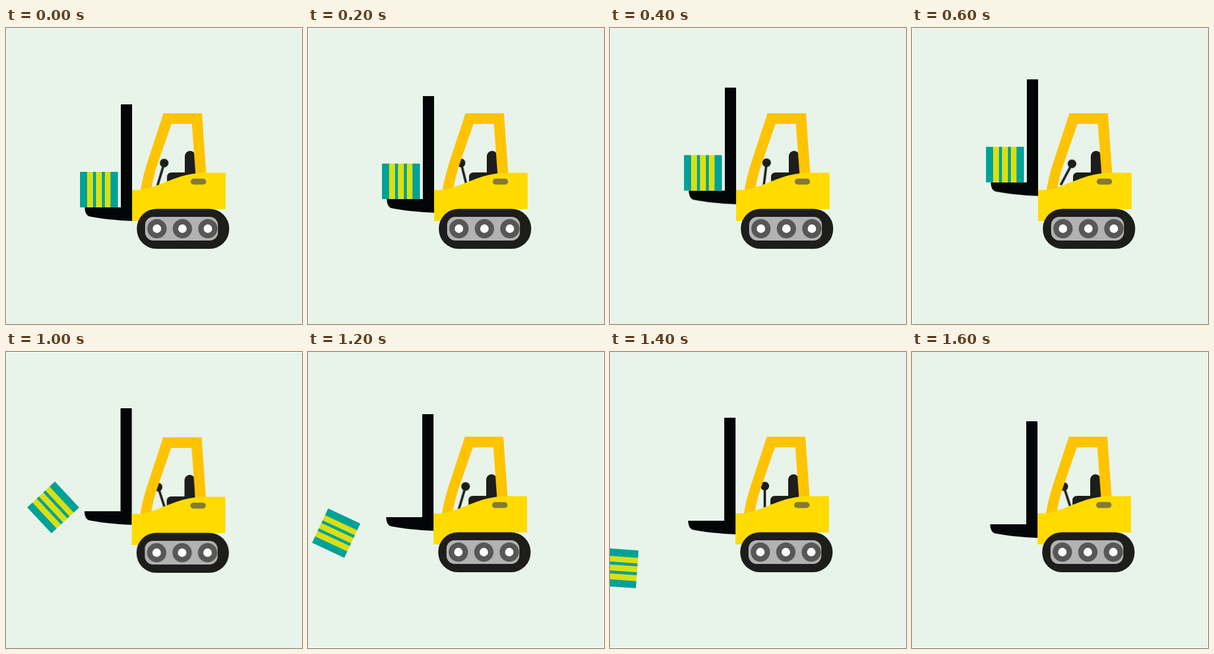
An HTML page for the animation above (1800 ms loop, 500 by 500 pixels).

```html
<!DOCTYPE html>
<html lang="en">
<head>
<meta charset="utf-8">
<title>Forklift</title>
<style>
  html, body { margin: 0; width: 100%; height: 100%; overflow: hidden; background: #fff; }
  svg { display: block; width: 100%; height: 100%; }
  .scene, .mast, .crate, .lever { animation: 1800ms step-end infinite; }
  .scene { animation-name: nudge; }
  .mast { animation-name: lift; }
  .crate { animation-name: drop; }
  .lever { animation-name: rock; transform-origin: 262.5px 244px; }

  @keyframes nudge {
    0% { transform: none; }
    55.55% { transform: translate(-.5px, 0); }
    66.66%, 100% { transform: translate(-1px, -1px); }
  }
  @keyframes lift {
    0% { transform: none; }
    11.11% { transform: translateY(-14px); }
    22.22% { transform: translateY(-28.3px); }
    33.33%, 44.44% { transform: translateY(-42.3px); }
    55.55% { transform: translateY(-34px); }
    66.66% { transform: translateY(-23px); }
    77.77% { transform: translateY(-17px); }
    88.88%, 100% { transform: translateY(-11px); }
  }
  @keyframes drop {
    0% { transform: translate(157px, 273px); visibility: visible; }
    11.11% { transform: translate(157px, 259px); }
    22.22% { transform: translate(157px, 244.7px); }
    33.33% { transform: translate(157px, 230.7px); }
    44.44% { transform: translate(142.3px, 225.5px) rotate(-21.5deg); }
    55.55% { transform: translate(80.2px, 262.6px) rotate(-43deg); }
    66.66% { transform: translate(48.7px, 307px) rotate(-65deg); }
    77.77% { transform: translate(17px, 366px) rotate(-86deg); visibility: visible; }
    88.88%, 100% { transform: translate(17px, 366px) rotate(-86deg); visibility: hidden; }
  }
  @keyframes rock {
    0% { transform: rotate(16.5deg); }
    11.11% { transform: rotate(-14deg); }
    22.22% { transform: rotate(7deg); }
    33.33% { transform: rotate(28deg); }
    44.44% { transform: rotate(5deg); }
    55.55% { transform: rotate(-18deg); }
    66.66% { transform: rotate(16.5deg); }
    77.77% { transform: rotate(0deg); }
    88.88%, 100% { transform: rotate(-18deg); }
  }
</style>
</head>
<body>
<svg viewBox="0 0 500 500">
  <defs>
    <g id="wheel">
      <circle r="16.3" fill="#575756"/>
      <circle r="7.2" fill="#fff"/>
    </g>
  </defs>
  <g class="scene">
    <rect x="1" y="1" width="499" height="499" fill="#e8f4ea"/>

    <path class="mast" fill="#040507" d="M133 303H194V129H213V326C186 325 160 322 142 318.500Q133.500 317 133 303Z"/>

    <g class="crate">
      <rect x="-32" y="-30" width="64" height="60" fill="#00a198"/>
      <path fill="#d9e012" d="M-20-30h10v60h-10zM-5-30h10v60h-10zM10-30h9.500v60H10z"/>
    </g>

    <!-- cab interior -->
    <g fill="#1d1d1b">
      <path d="M302 216.500a9 9 0 0 1 18 0V262H272V252q0-8 8-8h22z"/>
      <g class="lever">
        <path d="M262.500 228V268" stroke="#1d1d1b" stroke-width="4"/>
        <circle cx="262.500" cy="227.500" r="7.300"/>
      </g>
    </g>

    <path fill="#ffc400" d="M266 144H331L338.500 250H320.500L314 162H279.500L256 230Q249 250 245 275H227Q231 250 240 223Z"/>
    <path fill="#ffdb00" d="M213 273.500H228C262 268 290 245 335 244.500H371V306H300V326H213Z"/>
    <rect x="312" y="254.500" width="26" height="10" rx="5" fill="#83793b"/>

    <!-- track -->
    <rect x="221" y="305.500" width="156" height="67.500" rx="33" fill="#1d1d1b"/>
    <rect x="235" y="319" width="123" height="40" rx="14" fill="#b2b2b2"/>
    <use href="#wheel" x="255" y="339"/>
    <use href="#wheel" x="298" y="339"/>
    <use href="#wheel" x="341" y="339"/>
  </g>
</svg>
</body>
</html>
```
